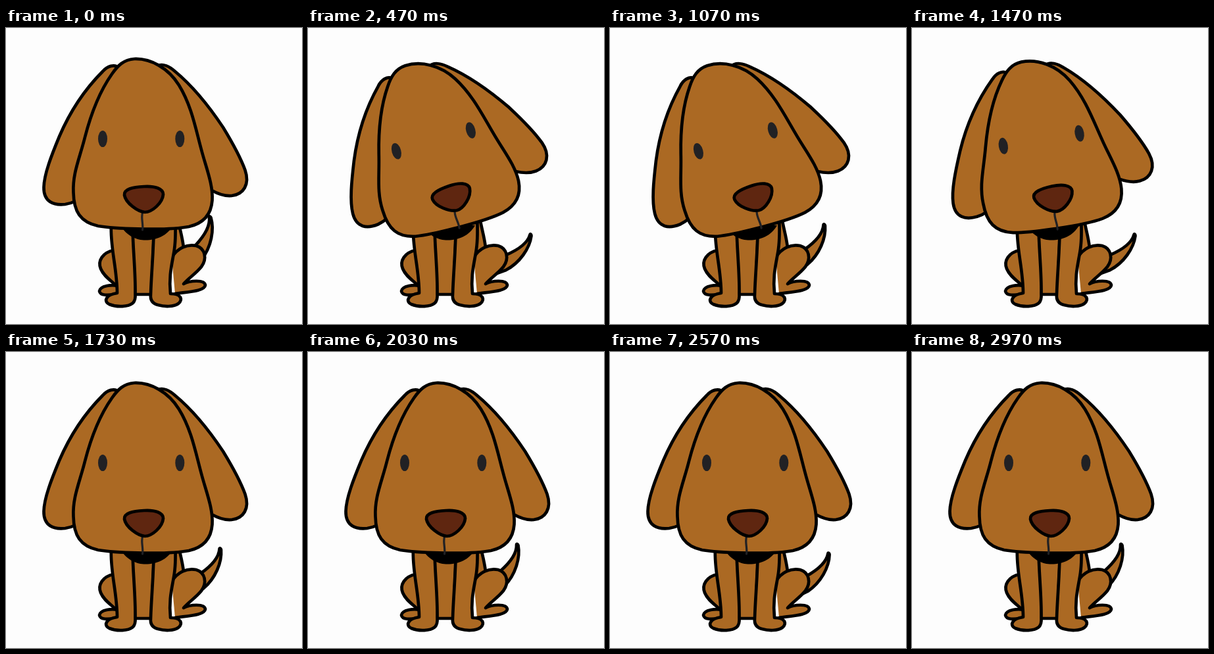
Recreate the animation shown at these times as an HTML page with a canvas. Size 450 by 450 pixels, loop 3010 ms.

```html
<!DOCTYPE html>
<html lang="en">
<head>
<meta charset="utf-8">
<title>Puppy</title>
<style>
html, body { margin: 0; width: 100%; height: 100%; overflow: hidden; background: #fdfdfd; }
canvas { display: block; width: 100vmin; height: 100vmin; }
</style>
</head>
<body>
<canvas id="stage" width="450" height="450"></canvas>
<script>
const ctx = document.getElementById('stage').getContext('2d');
const FUR = '#ab6923', INK = '#000', NOSE = '#5f2610', EYE = '#212124';
const LOOP = 3010, LAST = 89, STEP = 0.03; // frames per ms

const shape = d => new Path2D(d);
const tail = shape('M265 358 C280 351 291 349 301 345 C320 337 334 327 337.5 314 C338 312.5 339.5 314 339.5 316 C337 335 322 357 301 368 L268 380 Z');
const back = shape('M250 285 L261 287 C263 302 268 316 270 334 L270 350 L250 350 Z');
const haunchL = shape('M164 338 C147 341 139 354 144 366 C149 378 160 384 169 393 L185 380 L180 340 Z');
const footL = shape('M176 393 C160 389 143 392 142 400 C143 407 155 407 168 404 Z');
const haunchR = shape('M252 349 C260 335 275 328 289 331 C303 335 306 351 297 363 C289 373 279 379 270 389 C279 384 302 382 303 391 C302 400 277 401 257 404');
const chest = shape('M190 290 L226 290 L221 405 L196 405 Z');
const legL = shape('M160 300 C158 332 169 366 169 403 C153 405 147 415 157 420 C169 425 186 424 193 418 C196 415 197 411 196.5 404 C197 368 193 342 192 290 Z');
const legR = shape('M225 285 C225 338 221 369 220 405 C219 414 223 419 231 421 C241 424 255 424 262 419 C269 413 267 404 250 404 C247 375 253 357 256 336 C258 322 258 306 257 285 Z');
const collar = shape('M174 300 C184 317 199 322.5 212 322.5 C229 322.5 245 316 254 300 Z');
const earL = shape('M172 61 C165 54 154 58 147 66 C119 94 96 130 81 165 C69 194 58 222 57.5 242 C57 264 72 270 90 268 C97 267 102 265 106 263 L160 150 Z');
const earR = shape('M230 58 C238 53 249 59 257 66 C286 90 312 124 330 151 C344 174 357 198 363.5 216 C371 238 361 253 343 255 C332 256 322 252 313 247 L270 150 Z');
const skull = shape('M195 47 C179 48 170 57 161 70 C142 97 128 135 120 166 C112 198 101 221 102.5 250 C103 279 113 295 140 301 C163 305 186 305 208 305.5 C235 306 258 306 278 302 C300 297 312 283 313.5 262 C315 238 304 212 297 185 C288 152 282 118 263 87 C247 61 220 46 195 47 Z');
const nose = shape('M210 241 C226 240 239 244 239 253 C238 266 222 280 211 280 C200 279 182 266 180 254 C179 245 192 242 210 241 Z');
const mouth = shape('M207.5 281 C205 290 209 297 207.5 307');

function paint(path, fill = FUR) {
  ctx.fillStyle = fill;
  ctx.fill(path);
  ctx.strokeStyle = INK;
  ctx.lineWidth = 4.7;
  ctx.stroke(path);
}

function eye(x) {
  ctx.fillStyle = EYE;
  ctx.beginPath();
  ctx.ellipse(x, 168.5, 7, 12.6, 0, 0, Math.PI * 2);
  ctx.fill();
}

function turned(x, y, deg, draw) {
  ctx.save();
  ctx.translate(x, y);
  ctx.rotate(deg * Math.PI / 180);
  ctx.translate(-x, -y);
  draw();
  ctx.restore();
}

const ramp = (v, a, b) => Math.min(1, Math.max(0, (v - a) / (b - a)));

// Linear wag, five frames each way
const tailAngle = f => 6 * (5 - Math.abs(f % 10 - 5)) - 24;
const headAngle = f => -15.7 * (ramp(f, 0, 10) - ramp(f, 40, 50));

function drawHead() {
  paint(earL);
  paint(earR);
  paint(skull);
  eye(147);
  eye(264.3);
  ctx.strokeStyle = EYE;
  ctx.lineWidth = 3.2;
  ctx.stroke(mouth);
  paint(nose, NOSE);
}

function draw(f) {
  ctx.fillStyle = '#fdfdfd';
  ctx.fillRect(0, 0, 450, 450);
  turned(260, 368, tailAngle(f), () => paint(tail));
  [back, footL, haunchL, haunchR, chest, legL, legR].forEach(p => paint(p));
  ctx.fillStyle = INK;
  ctx.fill(collar);
  turned(208.8, 223.5, headAngle(f), drawHead);
}

ctx.lineJoin = ctx.lineCap = 'round';
const start = performance.now();

function tick() {
  const t = Math.floor((performance.now() - start) % LOOP / 10) * 10;
  draw(Math.min(LAST, Math.floor((t + 5) * STEP)));
  requestAnimationFrame(tick);
}
tick();
</script>
</body>
</html>
```
